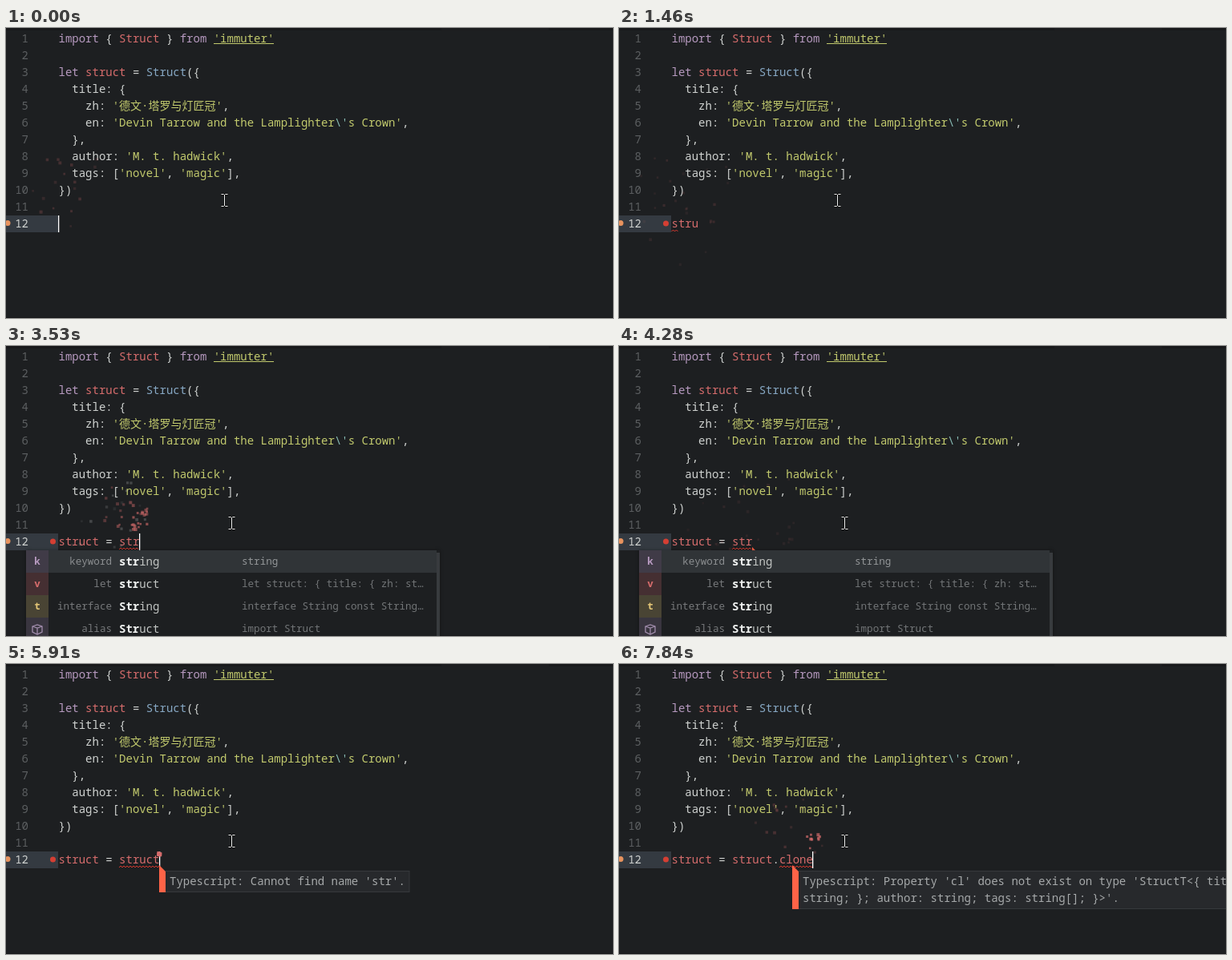
An HTML page with a canvas for the animation above (7.99 s loop, 757x362 px).

```html
<!DOCTYPE html>
<html lang="en">
<head>
<meta charset="utf-8">
<title>Editor typing</title>
<style>
html, body { margin: 0; height: 100%; overflow: hidden; background: #1d1f21; }
canvas { display: block; }
</style>
</head>
<body>
<canvas id="stage" width="757" height="362"></canvas>
<script>
const ctx = document.getElementById('stage').getContext('2d');
const LOOP = 7990, STEP = 147.6;
const LEFT = 65.5, CHAR = 8.4, LINE = 21;
const MONO = '"Noto Sans Mono", "Noto Sans CJK SC", "Noto Sans CJK", monospace';
const COLORS = { w: '#cfd2d0', p: '#b79ac0', r: '#d66c6c', g: '#c2ca6d', b: '#87a8c4', c: '#8abeb7', y: '#e5c777' };

// Each run starts with its colour letter; runs are split by "|".
const CODE = [
  "pimport|w { |rStruct|w } |pfrom|w |g'immuter'",
  '',
  'plet|w |rstruct|w = |bStruct|w({',
  'w  title: {',
  "w    zh: |g'德文·塔罗与灯匠冠'|w,",
  "w    en: |g'Devin Tarrow and the Lamplighter|c\\'|gs Crown'|w,",
  'w  },',
  "w  author: |g'M. t. hadwick'|w,",
  "w  tags: [|g'novel'|w, |g'magic'|w],",
  'w})'
];

// Keystrokes: time, resulting text, particle colour
const KEYS = [
  [-830, '', 'r'], [-630, '', 'r'],
  [250, 's', 'r'], [400, 'st', 'r'], [550, 'str', 'r'], [700, 'stru', 'r'],
  [2190, 'struct', 'r'], [2490, 'struct ', 'w'], [2780, 'struct =', 'w'], [2930, 'struct = ', 'w'],
  [3070, 'struct = s', 'r'], [3220, 'struct = st', 'r'], [3350, 'struct = str', 'r'],
  [5870, 'struct = struct', 'r'], [6040, 'struct = struct.', 'w'],
  [7040, 'struct = struct.c', 'r'], [7220, 'struct = struct.cl', 'r'], [7670, 'struct = struct.clone', 'r']
];

const missing = name => [`Typescript: Cannot find name '${name}'.`];
// Tooltips: from, to, column, lines
const TIPS = [
  [860, 1310, 4, missing('s')],
  [2500, 2780, 7, missing('stru')],
  [3800, 5870, 12, missing('str')],
  [5870, 6040, 15, missing('str')],
  [7370, LOOP, 18, [
    "Typescript: Property 'cl' does not exist on type 'StructT<{ title: { zh: string; en: ",
    "string; }; author: string; tags: string[]; }>'."]]
];
// Error underlines: from, to, first column, end column
const WAVES = [
  [860, 2190, 0, 1], [2190, 2780, 0, 7], [3500, 5870, 9, 12], [5870, 6040, 9, 15],
  [7040, 7370, 16, 17], [7370, 7670, 16, 18], [7670, LOOP, 16, 21]
];

const STRUCT_INFO = 'let struct: { title: { zh: st…';
// Rows: icon, kind, word, detail
const POPUPS = [
  { from: 1560, to: 2190, x: 0, word: 116, detail: 233, right: 480, prefix: 4, scroll: true, rows: [
    ['v', 'let', 'struct', STRUCT_INFO],
    ['a', 'alias', 'Struct', 'import Struct'],
    ['t', 'interface', 'StructT', 'interface StructT<T>'],
    ['t', 'type', 'StructOf', 'type StructOf<T>']] },
  { from: 3500, to: 5870, x: 25, word: 141, detail: 294, right: 541, prefix: 3, scroll: true, next: 5600, rows: [
    ['k', 'keyword', 'string', 'string'],
    ['v', 'let', 'struct', STRUCT_INFO],
    ['t', 'interface', 'String', 'interface String const String…'],
    ['a', 'alias', 'Struct', 'import Struct']] },
  { from: 6180, to: 7040, x: 90, word: 199, detail: 261, right: 503, prefix: 0, rows: [
    ['p', 'property', 'author', '(property) author: string'],
    ['m', 'method', 'clone', '(method) clone(fn: (struct: {…'],
    ['p', 'property', 'tags', '(property) tags: string[]'],
    ['p', 'property', 'title', '(property) title: { zh: strin…']] },
  { from: 7040, to: 7220, x: 105, word: 199, detail: 253, right: 501, prefix: 1, rows: [
    ['m', 'method', 'clone', '(method) clone(fn: (struct: { …'],
    ['s', '', 'cr', 'CR'],
    ['s', '', 'class', 'class']] },
  { from: 7220, to: 7670, x: 105, word: 199, detail: 253, right: 501, prefix: 2, rows: [
    ['m', 'method', 'clone', '(method) clone(fn: (struct: { …'],
    ['s', '', 'class', 'class']] }
];
// Icon background and foreground
const ICONS = {
  k: ['#403b47', COLORS.p], v: ['#452f32', COLORS.r], t: ['#494434', COLORS.y], a: ['#39353f', '#a18dac'],
  p: ['#452f32', COLORS.r], m: ['#3a4654', COLORS.b], s: ['#3b3e2c', '#b5bd68']
};

const active = t => item => t >= item[0] && t < item[1];
const column = n => LEFT + n * CHAR;
const random = n => { const v = Math.sin(n * 127.1 + 3.7) * 43758.5453; return v - Math.floor(v); };

function rect(x, y, w, h, color) {
  ctx.fillStyle = color;
  ctx.fillRect(x, y, w, h);
}

function text(str, x, y, color, size = 14, weight = 500, align = 'left') {
  ctx.font = `${weight} ${size}px ${MONO}`;
  ctx.textAlign = align;
  ctx.fillStyle = color;
  ctx.fillText(str, x, y);
  return x + ctx.measureText(str).width;
}

function dot(x, y, r, color) {
  ctx.fillStyle = color;
  ctx.beginPath();
  ctx.arc(x, y, r, 0, 7);
  ctx.fill();
}

function stroke(points, color, width) {
  ctx.strokeStyle = color;
  ctx.lineWidth = width;
  ctx.stroke(new Path2D(points));
}

function runs(line, y) {
  let x = LEFT;
  for (const run of line.split('|')) x = text(run.slice(1), x, y, COLORS[run[0]]);
}

function drawEditor(typed, failed) {
  rect(0, 0, 757, 362, '#1d1f21');
  rect(0, 0, 757, 3, '#18191b');
  rect(543, 0, 134, 3, '#1c1d1f');
  rect(0, 361, 757, 1, '#17181a');
  rect(0, 234, 65, 21, '#343a41');
  for (let n = 1; n <= 12; n++) {
    text(n, 28, 18 + (n - 1) * LINE, n === 12 ? '#cfd2d0' : '#5c5f61', 14, 400, 'right');
  }
  CODE.forEach((line, i) => line && runs(line, 18 + i * LINE));
  rect(259, 19, 75, 1, COLORS.g);
  dot(2, 243.5, 3.5, '#e8935e');
  if (failed) dot(58.5, 244, 3.5, '#d43f33');
  const line = typed.split(/([=.])/).map(s => (/[=.]/.test(s) ? 'w' : 'r') + s).join('|');
  runs(line, 249);
}

function drawWave([, , start, end]) {
  let path = `M${column(start)} 254`;
  for (let x = column(start) + 2, up = true; x <= column(end); x += 2, up = !up) path += `L${x} ${up ? 252 : 254}`;
  stroke(path, '#e0392f', 1);
}

function drawTip([, , col, lines]) {
  const x = Math.floor(column(col));
  const width = lines[0].length * CHAR + 10.5, height = 6 + lines.length * LINE;
  rect(x + 8, 258, width, height, '#36393c');
  rect(x + 8, 259, width - 1, height - 2, '#27292c');
  ctx.fillStyle = '#ff6347';
  ctx.fill(new Path2D(`M${x} 251L${x + 8} 259V${258 + height}H${x}Z`));
  lines.forEach((line, i) => text(line, x + 13, 276 + i * LINE, '#a6a9aa'));
}

function drawIcon(kind, x, y) {
  const [back, front] = ICONS[kind];
  rect(x, y, 28, 28, back);
  if (kind === 's') {
    stroke(`M${x + 7} ${y + 14}h8M${x + 20} ${y + 9}v10`, front, 2);
    ctx.fillStyle = front;
    ctx.fill(new Path2D(`M${x + 12} ${y + 9}l6 5l-6 5z`));
  } else if (kind === 'a') {
    stroke(`M${x + 8} ${y + 11}l6 -2l6 2v7l-6 3l-6 -3zl6 2l6 -2m-6 2v8`, front, 1.3);
  } else {
    text(kind, x + 14, y + 18, front, 12.6, 700, 'center');
  }
}

function drawPopup(p, t) {
  const selected = t >= p.next ? 1 : 0;
  const edge = p.right - (p.scroll ? 4 : 0);
  ctx.shadowColor = 'rgba(0, 0, 0, .4)';
  ctx.shadowBlur = 4;
  rect(p.x, 255, p.right - p.x, p.rows.length * 28, '#1d1f21');
  ctx.shadowBlur = 0;
  ctx.shadowColor = 'transparent';
  p.rows.forEach(([icon, kind, word, detail], i) => {
    const y = 255 + i * 28, on = i === selected, base = y + 18.5;
    if (on) rect(p.x, y, edge - p.x, 28, '#303437');
    drawIcon(icon, p.x, y);
    text(kind, p.word - 9, base - .5, on ? '#8b8e90' : '#77797b', 12.6, 500, 'right');
    const x = text(word.slice(0, p.prefix), p.word, base, '#f0f2f1', 14, 700);
    text(word.slice(p.prefix), x, base, '#c2c5c3');
    text(detail, p.detail, base - .5, on ? '#939698' : '#727577', 12.6);
  });
  if (p.scroll) rect(edge, 258, 4, 104, '#383b3e');
}

function drawParticles(t) {
  KEYS.forEach(([time, typed, color], k) => {
    const n = (t - time) * .06, alpha = .96 ** n;
    if (n < 0 || alpha < .05) return;
    const count = 6 + Math.floor(random(k) * 8);
    ctx.globalAlpha = alpha;
    for (let i = 0; i < count; i++) {
      const seed = k * 60 + i * 3 + 20;
      const vx = random(seed) * 2 - 1, vy = -3.5 + random(seed + 1) * 2, size = 2.5 + random(seed + 2) * 1.5;
      rect(column(typed.length) + vx * n - size / 2, 240 + vy * n + .0375 * n * n, size, size, COLORS[color]);
    }
    ctx.globalAlpha = 1;
  });
}

function drawPointer(x, y) {
  const beam = `M${x - 3.5} ${y - 7.5}h3l1 1l1 -1h3M${x + .5} ${y - 7}v14M${x - 3.5} ${y + 7.5}h3l1 -1l1 1h3`;
  stroke(beam, '#0b0c0d', 2.4);
  stroke(beam, '#f2f2f2', 1);
}

function draw(t) {
  const [keyTime, typed] = KEYS.filter(key => key[0] <= t).pop();
  const idle = t - keyTime - 640;
  drawEditor(typed, t >= 860);
  WAVES.filter(active(t)).forEach(drawWave);
  if (idle < 0 || Math.floor(idle / 400) % 2) rect(Math.floor(column(typed.length)), 234, 1.3, 21, '#ffffff');
  drawParticles(t);
  TIPS.filter(active(t)).forEach(drawTip);
  POPUPS.filter(p => t >= p.from && t < p.to).forEach(p => drawPopup(p, t));
  if (t < 2340) drawPointer(272, 215);
  else drawPointer(281, 221);
}

function frame(now) {
  draw(Math.floor((now % LOOP) / 147.5 + .13) * STEP);
  requestAnimationFrame(frame);
}
requestAnimationFrame(frame);
</script>
</body>
</html>
```
